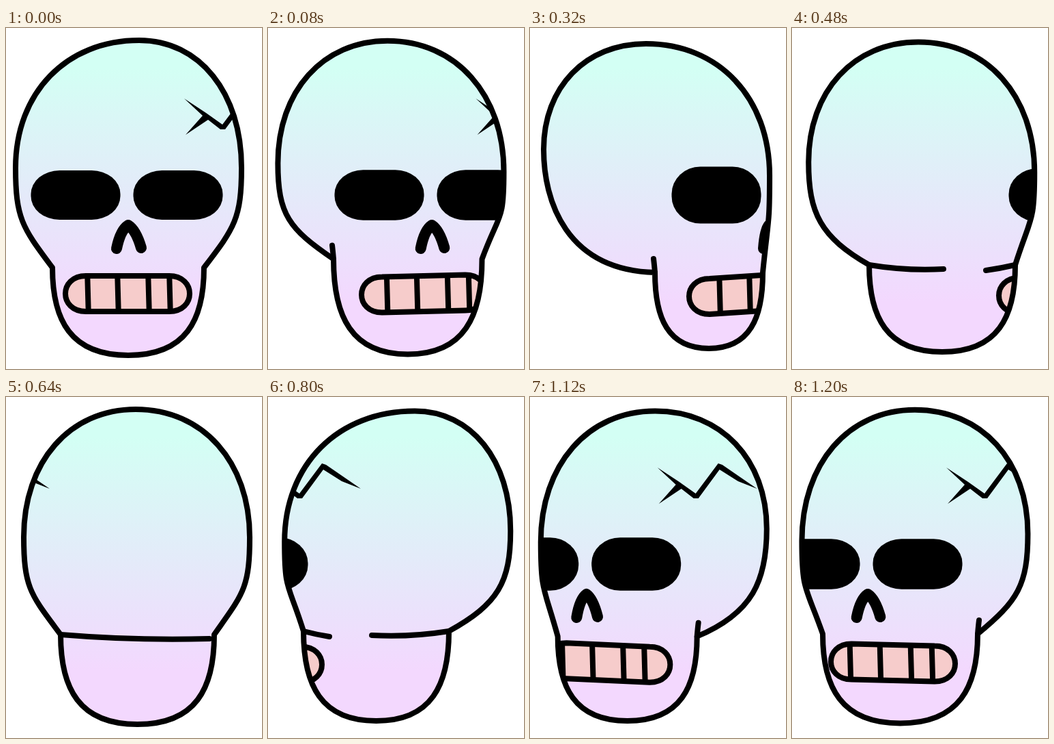
An HTML page with a canvas for the animation above (1280 ms loop, 375x498 px).

```html
<!DOCTYPE html>
<html lang="en">
<head>
<meta charset="utf-8">
<title>Turning skull</title>
<style>
  html, body { margin: 0; width: 100%; height: 100%; overflow: hidden; background: #fff; }
  canvas { display: block; }
</style>
</head>
<body>
<canvas id="stage" width="375" height="498"></canvas>
<script>
const ctx = document.getElementById('stage').getContext('2d');
const WIDTH = 375, HEIGHT = 498, STEP_MS = 80, STEPS = 16, LINE = 8;

// Key places of the moving parts, eased linearly in between
const columns = ['step', 'face', 'mouth', 'crack', 'crown', 'jawL', 'jawR', 'jawY'];
const keys = [
  [0, 179, 178, 153, 195, 68, 290, 350],
  [2, 301, 278, 240, 155, 124, 337, 325],
  [4, 350, 324, 240, 170, 183, 341, 357],
  [6, 460, 394, 240, 185, 113, 327, 346],
  [8, 560, 500, -190, 190, 80, 305, 347],
  [10, -80, -12, -118, 215, 52, 265, 342],
  [12, 26, 47, 0, 190, 32, 190, 357],
  [15, 111, 148, 118, 180, 45, 272, 346]
];

const skin = ctx.createLinearGradient(0, 60, 0, 400);
skin.addColorStop(0, '#d3fff4');
skin.addColorStop(1, '#f3d8fe');

function poseAt(step) {
  const i = keys.findLastIndex(key => key[0] <= step);
  const a = keys[i], b = keys[(i + 1) % keys.length];
  const k = (step - a[0]) / ((b[0] || STEPS) - a[0]);
  const pose = Object.fromEntries(columns.map((name, j) => [name, a[j] + (b[j] - a[j]) * k]));
  const angle = step / STEPS * 2 * Math.PI;
  return { ...pose, step, sin: Math.sin(angle), cos: Math.cos(angle) };
}

// Half of the head: crown, widest point, jaw joint, chin
function sideCurves({ crown, jawL, jawR, jawY, sin, cos }, side) {
  const edge = (side > 0 ? 351 : 20) - 6 * cos;
  const jaw = side > 0 ? jawR : jawL;
  const chin = (jawL + jawR) / 2;
  const top = 18 + 5 * sin * sin, bottom = 478 - 10 * sin * sin;
  const inset = Math.abs(edge - jaw);
  const wide = 218 - inset / 4;
  const round = 0.59;
  return [
    [crown, top],
    [crown + (edge - crown) * round, top], [edge, wide - (wide - top) * round], [edge, wide],
    [edge, wide + 75], [jaw + (edge - jaw) * 0.8, jawY - Math.max(0, 85 - inset / 2)], [jaw, jawY],
    [jaw, jawY + (bottom - jawY) * 0.6], [chin + (jaw - chin) * 0.76, bottom], [chin, bottom]
  ];
}

function headPath(pose) {
  const path = new Path2D();
  const right = sideCurves(pose, 1), left = sideCurves(pose, -1).reverse();
  path.moveTo(...right[0]);
  for (const half of [right, left])
    for (let i = 1; i < half.length; i += 3)
      path.bezierCurveTo(...half[i], ...half[i + 1], ...half[i + 2]);
  path.closePath();
  return path;
}

function drawEye(x, { sin }) {
  const w = 131, h = 72 + 11 * sin * sin;
  ctx.beginPath();
  ctx.roundRect(x - w / 2, 244 - h / 2, w, h, { x: w * 0.32, y: h * 0.48 });
  ctx.fill();
}

function drawNose({ face, cos }) {
  const spread = 10 + 9 * cos;
  ctx.lineWidth = 16;
  ctx.beginPath();
  ctx.moveTo(face - spread + 2, 322);
  ctx.quadraticCurveTo(face - spread * 0.6, 295, face, 288);
  ctx.quadraticCurveTo(face + spread * 0.6, 295, face + spread, 321);
  ctx.stroke();
}

function drawMouth({ mouth, sin }) {
  const half = 91, round = 30, bulge = round / 3, tilt = 4 * sin;
  const l = mouth - half, r = mouth + half, top = 362, bottom = 414;
  const path = new Path2D();
  path.moveTo(l + round, top + tilt);
  path.lineTo(r - round, top - tilt);
  path.bezierCurveTo(r + bulge, top - tilt, r + bulge, bottom - tilt, r - round, bottom - tilt);
  path.lineTo(l + round, bottom + tilt);
  path.bezierCurveTo(l - bulge, bottom + tilt, l - bulge, top + tilt, l + round, top + tilt);
  path.closePath();
  ctx.save();
  ctx.fillStyle = '#f6cccb';
  ctx.fill(path);
  ctx.lineWidth = LINE;
  ctx.stroke(path);
  ctx.clip(path);
  ctx.beginPath();
  for (const gap of [-58, -14, 31, 62]) {
    const x = mouth + gap + 12 * sin;
    ctx.moveTo(x - 1, top - 10);
    ctx.lineTo(x + 1, bottom + 10);
  }
  ctx.stroke();
  ctx.restore();
}

function drawCrack({ crack }) {
  const shape = [[108, 103], [140, 124], [164, 141], [197, 97], [203, 99], [254, 134], [226, 123],
                 [199, 106], [168, 148], [161, 148], [143, 134], [110, 156], [135, 128]];
  ctx.beginPath();
  for (const [x, y] of shape) ctx.lineTo(crack + x, y);
  ctx.fill();
}

// Where skull and jaw meet: a short tick from the side, a broken crease from behind
function drawCrease({ step, jawL, jawR, jawY }) {
  const turn = Math.min(step, STEPS - step);
  const dir = step <= 8 ? 1 : -1;
  const [near, far] = dir > 0 ? [jawL, jawR] : [jawR, jawL];
  const line = (from, to, sag, end) => {
    ctx.beginPath();
    ctx.moveTo(from, jawY);
    ctx.quadraticCurveTo((from + to) / 2, jawY + sag, to, jawY + end);
    ctx.stroke();
  };
  if (turn === 0) return;
  if (turn <= 4) return line(near, near - 2 * dir, -12, -20);
  const ear = 179 + 38 * (turn - 4);
  const earX = dir > 0 ? ear : WIDTH - 1 - ear;
  line(near, earX - 33 * dir, 9, 6);
  if (turn > 5 && (far - earX) * dir > 29) line(far, earX + 29 * dir, 5, 8);
}

function draw(pose) {
  const { step, face } = pose, head = headPath(pose);
  ctx.fillStyle = '#fff';
  ctx.fillRect(0, 0, WIDTH, HEIGHT);
  ctx.fillStyle = skin;
  ctx.fill(head);
  ctx.fillStyle = ctx.strokeStyle = '#000';
  ctx.lineCap = ctx.lineJoin = 'round';

  ctx.save();
  ctx.clip(head);
  if (Math.abs(step - 8) > 1) {
    drawEye(face - 77, pose);
    drawEye(face + 73, pose);
    drawNose(pose);
    drawMouth(pose);
  }
  if (step <= 2 || step >= 8) drawCrack(pose);
  ctx.restore();

  ctx.lineWidth = LINE;
  ctx.stroke(head);
  drawCrease(pose);
}

const start = performance.now();
function tick() {
  const time = Math.max(0, performance.now() - start);
  draw(poseAt(Math.floor(time / STEP_MS) % STEPS));
  requestAnimationFrame(tick);
}
tick();
</script>
</body>
</html>
```
